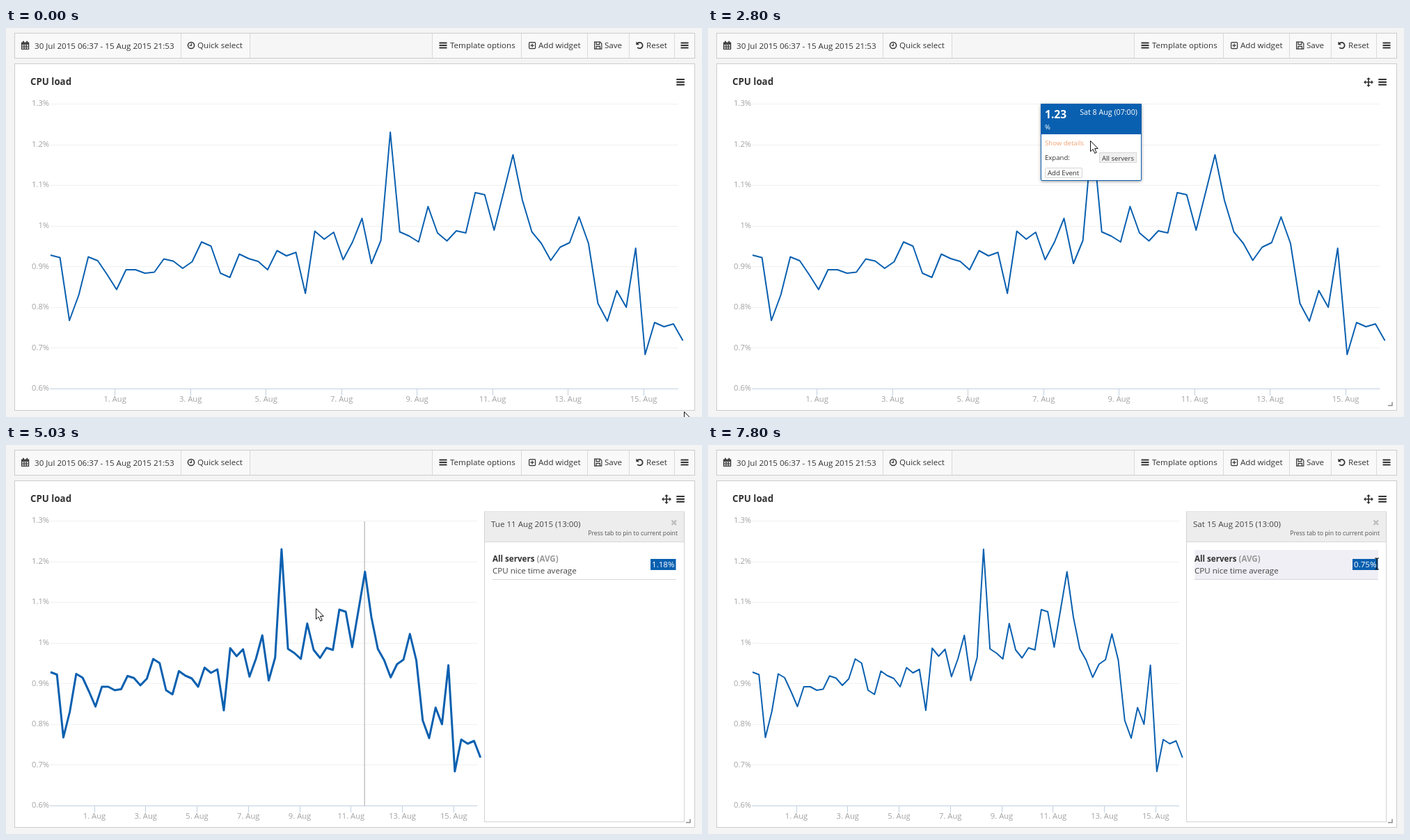
Recreate the animation shown at these times as an HTML page. Size 1000 by 560 pixels, loop 8 s.

```html
<!DOCTYPE html>
<html lang="en">
<head>
<meta charset="utf-8">
<title>CPU load</title>
<style>
html, body { margin: 0; width: 100%; height: 100%; overflow: hidden; background: #f4f4f4; }
svg { display: block; width: 100vw; height: 100vh; }
text { font: 11.6px "Open Sans", sans-serif; fill: #333; white-space: pre; }
.bold { font-weight: 700; }
.axis text { font-size: 11.2px; fill: #a2a2a2; }
.days text { text-anchor: middle; }
.pct text { text-anchor: end; }
.small text { font-size: 9.6px; }
.end { text-anchor: end; }
.icon { fill: none; stroke: #333; stroke-width: 1.2; }
#popup .white, #panel .white { fill: #fff; }
</style>
</head>
<body>
<svg viewBox="0 0 1000 560">
  <defs>
    <path id="bars" d="M0 0h11v2H0zM0 3.6h11v2H0zM0 7.2h11v2H0z" fill="#333"/>
    <filter id="shadow" x="-10%" y="-10%" width="120%" height="125%">
      <feDropShadow dx="0" dy="1" stdDeviation="2" flood-opacity=".4"/>
    </filter>
    <clipPath id="plot"><rect x="63" y="100" width="915" height="430"/></clipPath>
  </defs>

  <rect width="1000" height="560" fill="#f4f4f4"/>

  <!-- toolbar -->
  <rect x="12.5" y="7.5" width="977" height="36" fill="#f6f6f6" stroke="#ccc"/>
  <path d="M13 8h337v35H13zM613 8h376v35H613z" fill="#f9f9f9"/>
  <path d="M251.5 8v35M350.5 8v35M612.5 8v35M740.5 8v35M835.5 8v35M895.5 8v35M960.5 8v35" stroke="#d9d9d9"/>
  <text x="41" y="29.5">30 Jul 2015 06:37 - 15 Aug 2015 21:53</text>
  <text x="275" y="29">Quick select</text>
  <text x="638" y="29">Template options</text>
  <text x="765" y="29">Add widget</text>
  <text x="860" y="29">Save</text>
  <text x="920" y="29">Reset</text>
  <g class="icon">
    <path d="M22.6 21h10v9.4h-10zM22.6 24h10M26 24v6.4M29.2 24v6.4M22.6 27.2h10"/>
    <path d="M22.6 22.2h10" stroke-width="2"/>
    <path d="M25 18.8v3M30.2 18.8v3" stroke-width="1.8"/>
    <circle cx="266" cy="25" r="4.6" stroke-width="1.5"/>
    <path d="M266.3 22v3.4h-2.6"/>
    <rect x="751.6" y="20.6" width="9" height="9" rx="1.3"/>
    <path d="M753.4 25.1h5.4M756.1 22.4v5.4"/>
    <path d="M845.6 20.2h8l2.2 2.2v7.8h-10.2zM848 20.2v3.4h4.8v-3.4M848 30v-3.6h5.4V30"/>
    <path d="M907 22.4a4.3 4.3 0 1 1 .2 5.6" stroke-width="1.8"/>
    <path d="M905.4 19.6v4.6h4.6z" fill="#333" stroke="none"/>
  </g>
  <use href="#bars" x="622.5" y="20.4"/>
  <use href="#bars" x="969.5" y="20.4"/>

  <!-- widget -->
  <rect x="12.5" y="51.5" width="977" height="499" fill="#fff" stroke="#ccc"/>
  <text class="bold" x="35" y="81.5" style="font-size:13.3px">CPU load</text>
  <use href="#bars" transform="translate(963.3 73) scale(1.05)"/>
  <g id="tools">
    <path d="M943 78h12M949 72v12" stroke="#333" stroke-width="1.7"/>
    <path d="M949 71l2.7 3h-5.4zM949 85l2.7-3h-5.4zM942 78l3-2.7v5.4zM956 78l-3-2.7v5.4z" fill="#333"/>
    <path d="M983 538.5v5h-6" fill="none" stroke="#8a8a8a" stroke-width="1.5"/>
  </g>

  <!-- chart -->
  <path id="grid" stroke="#f0f0f0"/>
  <path id="base" stroke="#c0d0e0" fill="none"/>
  <g id="pct" class="axis pct"></g>
  <g id="days" class="axis days"></g>
  <path id="cross" stroke="#c0c0c0" stroke-width="1.4"/>
  <path id="curve" clip-path="url(#plot)" fill="none" stroke="#0a60b0" stroke-linejoin="round"/>

  <g id="popup" class="small">
    <rect x="478.5" y="109.5" width="144" height="110" rx="1.5" fill="#fff" stroke="#0a60b0" filter="url(#shadow)"/>
    <rect x="478" y="109" width="145" height="44" fill="#0a60b0"/>
    <text class="white bold" x="484" y="130" style="font-size:15.6px">1.23</text>
    <text class="white" x="484" y="146">%</text>
    <text class="white end" x="617" y="125" style="font-size:10.7px">Sat 8 Aug (07:00)</text>
    <text id="link" x="484" y="168.5">Show details</text>
    <text x="484" y="190">Expand:</text>
    <rect x="562.5" y="179.5" width="53" height="14" fill="#f0f0f0" stroke="#d8d8d8"/>
    <text x="566" y="190.5">All servers</text>
    <rect x="484.5" y="201.5" width="53" height="14" rx="1.5" fill="#fafafa" stroke="#d8d8d8"/>
    <text x="488" y="212">Add Event</text>
  </g>

  <g id="panel">
    <rect x="687.5" y="96" width="287" height="446.5" fill="#fff" stroke="#d2d2d2"/>
    <rect x="688" y="96.5" width="286" height="42.5" fill="#ededed"/>
    <path d="M688 139.5h286" stroke="#d8d8d8"/>
    <text id="date" x="697" y="118" style="fill:#444"></text>
    <path d="M956.5 108.5l6.5 6.5m0-6.5l-6.5 6.5" stroke="#bdbdbd" stroke-width="2.4"/>
    <text class="end" x="965" y="130" style="font-size:8.7px;fill:#555">Press tab to pin to current point</text>
    <rect id="row" x="699" y="151" width="264" height="42" fill="#f0eff5"/>
    <text class="bold" x="699" y="168">All servers <tspan fill="#999">(AVG)</tspan></text>
    <text x="699" y="185" style="fill:#444">CPU nice time average</text>
    <path d="M699 193.5h264" stroke="#d6d6d6"/>
    <rect x="926" y="164" width="36.5" height="16" fill="#0a60b0"/>
    <text id="value" class="white" x="928" y="176"></text>
  </g>

  <g id="cursor" stroke-linejoin="round">
    <path id="arrow" d="M.5 .5V15.8L4.1 12.5L6.8 18.4L9.2 17.3L6.6 11.5H11.3Z" fill="#fff" stroke="#111"/>
    <g id="hand" fill="#fff" stroke="#111">
      <path d="M-1.6 1Q-1.6-.8 0-.8T1.7 1V7.4Q3.6 6.4 4.7 8.4Q6.6 7.4 7.5 9.5Q9.6 9 9.6 11.5V15Q9.6 18 7.8 21.3H-2Q-3 18-7 13.6Q-8 11-5.5 11L-1.6 14Z"/>
      <path d="M1.7 7v4.5M4.7 8.4v3.4M7.5 9.5v3" fill="none"/>
    </g>
    <path id="beam" d="M-3-8h2l1 1 1-1h2M0-7V7M-3 8h2l1-1 1 1h2" fill="none" stroke="#111" stroke-width="1.2"/>
  </g>
</svg>

<script>
const LOOP = 8000, LEFT = 64, WIDE = 13.56, NARROW = 9.22, LAG = 200;
const OPEN_POPUP = 2230, OPEN_PANEL = 3470, LEAVE = 6560;
const $ = id => document.getElementById(id);
const set = (id, name, value) => $(id).setAttribute(name, value);
const show = (id, on) => { $(id).style.display = on ? '' : 'none'; };

// one sample every six hours, as height on the stage
const load = [
  327, 330.5, 421, 384, 329.5, 335, 355, 376.5, 348, 348, 353, 351.5, 332.5, 335.5, 346, 336.5, 308,
  314, 353, 359, 325.5, 332, 336, 348, 320.5, 328, 323, 382, 292.5, 304, 294, 333.5, 308, 274,
  339, 306, 150, 293.5, 299.5, 308, 257, 295, 306.5, 292, 295, 237, 240, 291, 237, 182.5, 248,
  293.5, 310, 334.5, 315.5, 309, 272, 310, 396.5, 422, 378, 402, 317, 470, 424, 430, 426, 450];

// pointer stops: time, x, y
const stops = [
  [0, 974, 552], [30, 974, 552], [250, 880, 470], [500, 700, 330], [830, 562, 235],
  [1100, 546, 205], [1300, 541, 192], [1500, 549, 175], [1700, 552, 165], [2000, 553, 153],
  [2450, 553, 153], [2630, 549, 162], [2800, 549, 162], [2980, 536, 163], [3170, 530, 163],
  [3470, 530, 163], [3730, 531, 168], [3900, 533, 173], [4210, 545, 187], [4400, 558, 198],
  [4520, 560, 203], [4750, 530, 215], [5100, 421, 238], [5530, 264, 250], [5720, 229, 245],
  [6000, 255, 235], [6300, 450, 210], [6600, 720, 190], [6800, 878, 182], [7100, 890, 180],
  [7630, 941, 172], [7800, 961, 171], [LOOP, 961, 171]];

const slope = (i, k) => stops[i] && stops[i + 1]
  ? (stops[i + 1][k] - stops[i][k]) / (stops[i + 1][0] - stops[i][0]) : 0;
const tangent = (i, k) => {
  const a = slope(i - 1, k), b = slope(i, k);
  return a * b > 0 ? 2 * a * b / (a + b) : 0;
};

// monotone cubic through the stops; k picks x (1) or y (2)
function pointer(t, k) {
  let i = 0;
  while (i < stops.length - 2 && t >= stops[i + 1][0]) i++;
  const a = stops[i], b = stops[i + 1], h = b[0] - a[0], u = (t - a[0]) / h, v = 1 - u;
  return a[k] * v * v * (1 + 2 * u) + b[k] * u * u * (3 - 2 * u)
    + h * u * v * (v * tangent(i, k) - u * tangent(i + 1, k));
}

function addText(group, y, label, x = 0) {
  const el = document.createElementNS('http://www.w3.org/2000/svg', 'text');
  el.setAttribute('x', x);
  el.setAttribute('y', y);
  el.textContent = label;
  $(group).append(el);
}
const levels = Array.from({ length: 8 }, (_, i) => 109.5 + i * 58.57);
levels.forEach((y, i) => addText('pct', y + 2.8, +(1.3 - i / 10).toFixed(1) + '%', 62));
for (let day = 1; day < 16; day += 2) addText('days', 538, day + '. Aug');

const DAYS = ['Sun', 'Mon', 'Tue', 'Wed', 'Thu', 'Fri', 'Sat'];
function dateLabel(i) {
  const d = new Date(Date.UTC(2015, 6, 30, 7 + i * 6));
  const hour = String(d.getUTCHours()).padStart(2, '0');
  return `${DAYS[d.getUTCDay()]} ${d.getUTCDate()} ${d.getUTCMonth() === 6 ? 'Jul' : 'Aug'} 2015 (${hour}:00)`;
}

function drawChart(step, thick) {
  const right = LEFT + 66.5 * step;
  set('grid', 'd', levels.slice(0, 7).map(y => `M63 ${Math.floor(y) + .5}H${right}`).join(''));
  let base = `M63 519.5H${right}`;
  [...$('days').children].forEach((label, i) => {
    const x = LEFT + (41 / 6 + 8 * i) * step;
    label.setAttribute('x', x);
    base += `M${Math.floor(x) + .5} 520v9`;
  });
  set('base', 'd', base);
  set('curve', 'd', 'M' + load.map((y, i) => `${LEFT + i * step} ${y}`).join('L'));
  set('curve', 'stroke-width', thick ? 3 : 2);
}

function draw(t) {
  const panel = t >= OPEN_PANEL;
  const hover = t >= 90 && t < OPEN_POPUP || panel && t < LEAVE;
  const squeeze = Math.min(1, Math.max(0, (t - 3430) / 420));
  const ease = panel ? (1 - Math.cos(Math.PI * squeeze)) / 2 : 0;
  drawChart(WIDE + (NARROW - WIDE) * ease, hover);

  const step = panel ? NARROW : WIDE;
  let index = Math.round((pointer(Math.max(0, t - LAG), 1) - LEFT) / step);
  index = t >= LEAVE ? 65 : Math.min(67, Math.max(0, index));
  show('cross', hover);
  set('cross', 'd', `M${Math.floor(LEFT + index * step) + .2} 110V520`);

  show('tools', t >= 60);
  show('popup', t >= OPEN_POPUP && !panel);
  $('popup').style.opacity = t < 2270 ? .6 : 1;
  $('link').style.fill = t < 2500 ? '#e5803f' : '#f0a273';
  show('panel', panel);
  show('row', t >= 6700);
  $('date').textContent = dateLabel(index);
  $('value').textContent = ((519.5 - load[index]) / 585.7 + .6).toFixed(2) + '%';

  const x = pointer(t, 1), y = pointer(t, 2);
  const hand = t >= 1380 && t < 2470 || t >= 2900 && !panel;
  const beam = t > 6800 && x > 927;
  show('hand', hand);
  show('beam', beam);
  show('arrow', !hand && !beam);
  set('cursor', 'transform', `translate(${Math.round(x)} ${Math.round(y)})`);
}

const start = performance.now();
function tick() {
  draw((performance.now() - start) % LOOP);
  requestAnimationFrame(tick);
}
tick();
</script>
</body>
</html>
```
